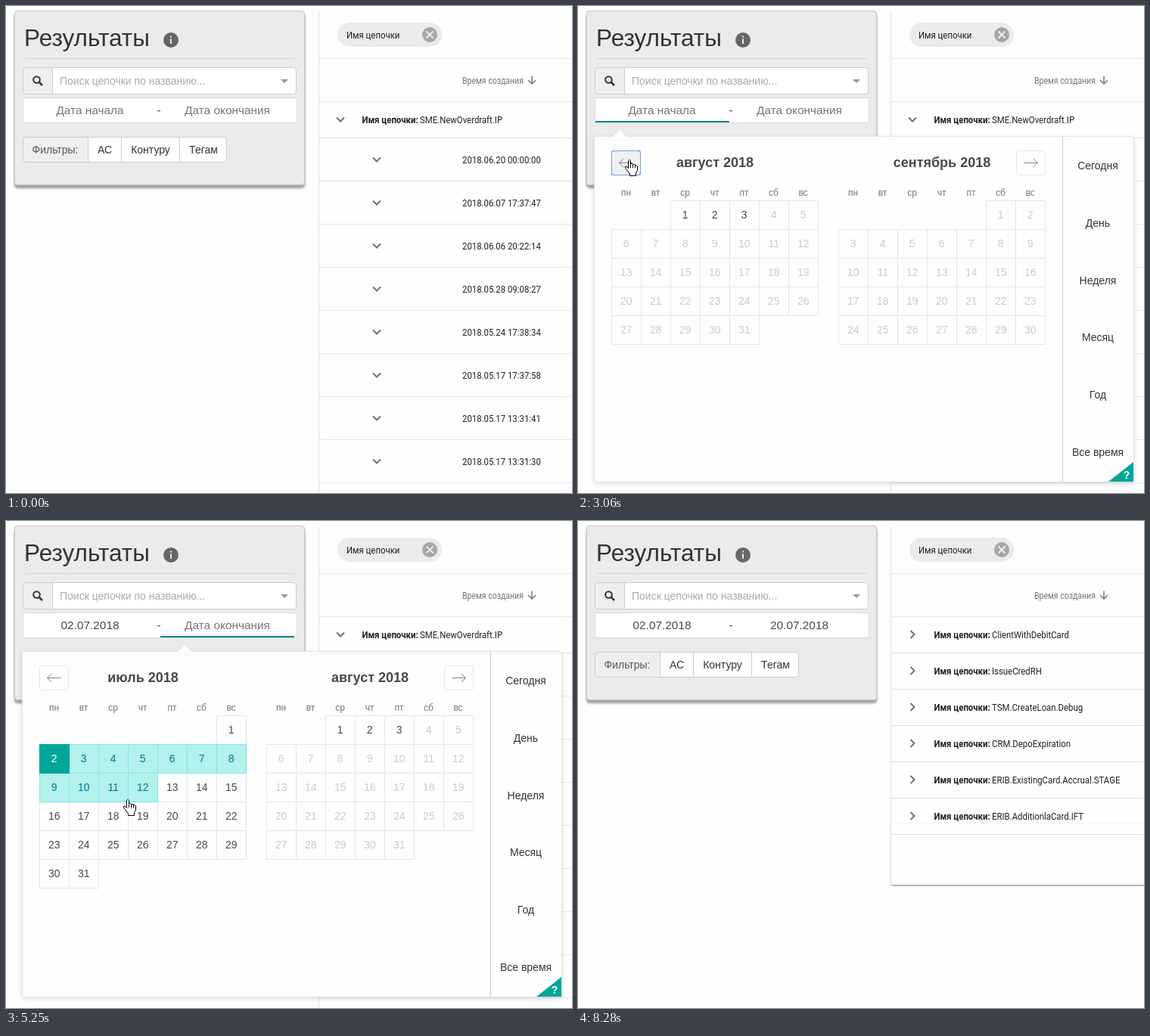
An HTML page with a canvas that plays this animation: 748x644 px, repeating every 8870 ms.

```html
<!DOCTYPE html>
<html lang="ru">
<head>
<meta charset="utf-8">
<title>Выбор периода</title>
<style>
html, body { margin: 0; width: 748px; height: 644px; overflow: hidden; background: #fefefe; }
canvas { display: block; }
</style>
</head>
<body>
<canvas id="stage" width="748" height="644"></canvas>
<script>
const ctx = document.getElementById('stage').getContext('2d');
const LOOP = 8870;
const PAPER = '#fefefe', TEAL = '#00a699', CELL_LINE = '#e4e7e7';
const SANS = '"Liberation Sans", Arial, sans-serif';
const ROBOTO = 'Roboto, sans-serif';
const CONDENSE = 0.875;

const T = { blank: 1920, open: 1980, caretOff: 2480, focusPrev: 3060, slide: 3240, slid: 3450,
  start: 4760, press: 6230, close: 6380, results: 6840, arrowBack: 7000, gone: 8280 };

// Pointer path: time, x, y of the hot spot
const PATH = [
  [750, 372, 0], [1550, 138, 137], [1769, 138, 137], [1770, 138, 140], [2480, 138, 140],
  [3060, 68, 203], [3540, 68, 203], [4080, 61, 306], [4140, 61, 308], [4760, 61, 308],
  [5610, 223, 405], [5700, 223, 405], [5790, 225, 404], [6380, 225, 404],
  [7000, 223, 403], [7870, 223, 403], [8280, 547, 644]
];

const MONTHS = [
  { name: 'июль 2018', offset: 6, days: 31, enabled: 31 },
  { name: 'август 2018', offset: 2, days: 31, enabled: 3 },
  { name: 'сентябрь 2018', offset: 5, days: 30, enabled: 0 }
];
const WEEK = ['пн', 'вт', 'ср', 'чт', 'пт', 'сб', 'вс'];
const PERIODS = ['Сегодня', 'День', 'Неделя', 'Месяц', 'Год', 'Все время'];
const RUNS = ['2018.06.20 00:00:00', '2018.06.07 17:37:47', '2018.06.06 20:22:14', '2018.05.28 09:08:27',
  '2018.05.24 17:38:34', '2018.05.17 17:37:58', '2018.05.17 13:31:41', '2018.05.17 13:31:30'];
const CHAINS = ['ClientWithDebitCard', 'IssueCredRH', 'TSM.CreateLoan.Debug', 'CRM.DepoExpiration',
  'ERIB.ExistingCard.Accrual.STAGE', 'ERIB.AdditionlaCard.IFT'];

const between = (t, a, b) => t >= a && t < b;
const clamp01 = v => Math.max(0, Math.min(1, v));
const ease = p => p * p * (3 - 2 * p);

function text(str, x, y, size, color, { align = 'left', weight = '', family = SANS } = {}) {
  ctx.font = `${weight} ${size}px ${family}`;
  ctx.textAlign = align;
  ctx.fillStyle = color;
  ctx.fillText(str, x, y);
}

const centered = (str, x, y, size, color, weight) => text(str, x, y, size, color, { align: 'center', weight });

function narrow(str, x, y, size, color, weight) {
  ctx.save();
  ctx.translate(x, y);
  ctx.scale(CONDENSE, 1);
  text(str, 0, 0, size, color, { weight, family: ROBOTO });
  ctx.restore();
}

function rect(x, y, w, h, fill) {
  ctx.fillStyle = fill;
  ctx.fillRect(x, y, w, h);
}

function box(x, y, w, h, fill, stroke, radius = 0) {
  ctx.beginPath();
  ctx.roundRect(x + 0.5, y + 0.5, w, h, radius);
  ctx.fillStyle = fill;
  ctx.fill();
  ctx.strokeStyle = stroke;
  ctx.lineWidth = 1;
  ctx.stroke();
}

function trace(points) {
  ctx.beginPath();
  points.forEach(([x, y], i) => i ? ctx.lineTo(x, y) : ctx.moveTo(x, y));
}

function polyline(points, color, width = 1) {
  trace(points);
  ctx.strokeStyle = color;
  ctx.lineWidth = width;
  ctx.stroke();
}

function polygon(points, fill) {
  trace(points);
  ctx.closePath();
  ctx.fillStyle = fill;
  ctx.fill();
}

function disc(x, y, r, fill) {
  ctx.beginPath();
  ctx.arc(x, y, r, 0, Math.PI * 2);
  ctx.fillStyle = fill;
  ctx.fill();
}

function withShadow(color, blur, dy, draw) {
  ctx.save();
  ctx.shadowColor = color;
  ctx.shadowBlur = blur;
  ctx.shadowOffsetY = dy;
  draw();
  ctx.restore();
}

function chevronDown(x, y) {
  polyline([[x - 5, y - 2.5], [x, y + 2.5], [x + 5, y - 2.5]], '#707070', 2);
}

function chevronRight(x, y) {
  polyline([[x - 2.5, y - 5], [x + 2.5, y], [x - 2.5, y + 5]], '#707070', 2);
}

function chainRow(name, y) {
  narrow('Имя цепочки:', 470.5, y + 5, 13, '#212121', 'bold');
  narrow(name, 547, y + 5, 13, '#212121');
  rect(414, y + 24, 334, 1, '#e0e0e0');
}

function drawTable(t) {
  const filtered = t >= T.results;
  if (filtered) {
    withShadow('rgba(0,0,0,.55)', 2, 1, () => rect(414, 400, 340, 81, PAPER));
    rect(414, 400, 334, 81, PAPER);
  }
  rect(413, 8, 1, filtered ? 473 : 636, '#e2e2e2');
  ctx.beginPath();
  ctx.roundRect(438, 22, 138, 32, 16);
  ctx.fillStyle = '#ebebeb';
  ctx.fill();
  narrow('Имя цепочки', 450, 43, 13, '#212121');
  disc(560, 38, 10, '#a6a6a6');
  polyline([[555.5, 33.5], [564.5, 42.5]], '#ebebeb', 2);
  polyline([[564.5, 33.5], [555.5, 42.5]], '#ebebeb', 2);
  rect(414, 69, 334, 1, '#e8e8e8');
  narrow('Время создания', 603, 103, 12, '#757575');
  polyline([[695, 92.5], [695, 103]], '#757575', 1.5);
  polyline([[690, 98], [695, 103], [700, 98]], '#757575', 1.5);
  rect(414, 126, 334, 1, '#e8e8e8');

  if (filtered) {
    CHAINS.forEach((name, i) => {
      chevronRight(442, 150 + i * 48);
      chainRow(name, 150 + i * 48);
    });
    return;
  }
  chevronDown(442, 150);
  chainRow('SME.NewOverdraft.IP', 150);
  RUNS.forEach((run, i) => {
    const y = 203 + i * 57;
    chevronDown(490, y);
    narrow(run, 603, y + 5, 13, '#212121');
    rect(414, y + 28, 334, 1, '#e8e8e8');
  });
}

function dateField(value, hint, x) {
  centered(value || hint, x, 143, 15.4, value ? '#484848' : '#757575');
}

function drawPanel(t) {
  withShadow('rgba(0,0,0,.35)', 3, 4, () => box(11, 6, 383, 230, '#ebebeb', '#c6c6c6', 4));
  box(11, 6, 383, 230, '#ebebeb', '#c6c6c6', 4);
  text('Результаты', 24, 53, 31.5, '#333');
  disc(218, 45, 10, '#666');
  rect(217, 43.5, 2, 6.5, '#ebebeb');
  rect(217, 39.5, 2, 2, '#ebebeb');
  rect(25, 69, 357, 1, '#d2d2d2');

  box(22, 81, 361, 35, '#fff', '#ccc', 4);
  box(22, 81, 39, 35, '#eee', '#ccc', [4, 0, 0, 4]);
  ctx.beginPath();
  ctx.arc(40.5, 97.5, 4.3, 0, Math.PI * 2);
  ctx.strokeStyle = '#333';
  ctx.lineWidth = 2;
  ctx.stroke();
  polyline([[43.5, 100.5], [48, 105]], '#333', 2.5);
  text('Поиск цепочки по названию...', 71, 104, 14, '#aaa');
  polygon([[363, 97], [373, 97], [368, 102]], '#999');

  box(22, 121, 362, 33, '#fff', '#dbdbdb');
  dateField(t >= T.start && '02.07.2018', 'Дата начала', 111);
  centered('-', 202, 143, 15.4, '#484848');
  dateField(t >= T.close && '20.07.2018', 'Дата окончания', 292.5);

  box(22, 173, 269, 33, '#fff', '#ccc', 4);
  box(22, 173, 86, 33, '#eee', '#ccc', [4, 0, 0, 4]);
  rect(152, 174, 1, 33, '#ccc');
  rect(229, 174, 1, 33, '#ccc');
  centered('Фильтры:', 65, 195, 14, '#555');
  centered('АС', 130.5, 195, 14, '#333');
  centered('Контуру', 191, 195, 14, '#333');
  centered('Тегам', 261, 195, 14, '#333');
}

function drawFocus(t) {
  const first = t < T.start;
  rect(first ? 23 : 204, 152, 177, 2, '#008489');
  if (between(t, T.blank, T.caretOff)) rect(111, 129, 1, 18, '#333');
  if (between(t, T.start, 5230) || between(t, 5700, T.press)) rect(293, 129, 1, 18, '#333');
  const x = first ? 55 : 236;
  polygon([[x - 10, 174], [x, 163.5], [x + 10, 174]], PAPER);
  polyline([[x - 10, 173], [x, 163.5], [x + 10, 173]], '#e0e0e0', 0.7);
}

// Day of July under the pointer, 0 when there is none
function dayAt(p) {
  const col = Math.floor((p.x - 44) / 39), row = Math.floor((p.y - 257) / 38);
  const day = row * 7 + col - 5;
  return col >= 0 && col < 7 && row >= 0 && day >= 1 && day <= 31 ? day : 0;
}

function dayStyle(month, day, t, hover) {
  if (day > month.enabled) return [PAPER, CELL_LINE, '#cacccd'];
  const plain = [PAPER, CELL_LINE, '#484848'];
  if (month !== MONTHS[0] || t < T.slid) return plain;
  if (t < T.start) return day === hover ? [CELL_LINE, '#dbdede', '#484848'] : plain;
  if (day === 2) return [TEAL, TEAL, '#fff'];
  if (day > 2 && day <= Math.max(3, hover))
    return [t >= T.press && day === hover ? '#80e8e0' : '#b2f1ec', '#80e8e0', '#007a87'];
  return plain;
}

function drawMonth(month, left, t, hover) {
  centered(month.name, left + 137, 213, 18, '#484848', 'bold');
  const cells = [];
  for (let day = 1; day <= month.days; day++) {
    const slot = day + month.offset - 1;
    const style = dayStyle(month, day, t, hover);
    const rank = style[0] === PAPER ? 0 : style[0] === TEAL ? 2 : 1;
    cells.push({ day, style, rank, x: left + slot % 7 * 39, y: 257 + Math.floor(slot / 7) * 38 });
  }
  cells.sort((a, b) => a.rank - b.rank);
  for (const { day, style: [fill, stroke, ink], x, y } of cells) {
    box(x, y, 39, 38, fill, stroke);
    centered(day, x + 19.7, y + 24, 14, ink);
  }
}

function navButton(x, dir, stroke, focused) {
  box(x, 191, 38, 32, focused ? '#f0f0f0' : PAPER, stroke, 3);
  if (focused) box(x, 191, 38, 32, 'rgba(0,0,0,0)', stroke, 1);
  const mid = x + 19.5, tip = mid + dir * 9;
  polyline([[mid - dir * 9, 207.5], [tip, 207.5]], '#82888a');
  polyline([[tip - dir * 6, 202], [tip, 207.5], [tip - dir * 6, 213]], '#82888a');
}

function drawCalendar(t, p) {
  if (t < T.open) {
    rect(22, 173, 712, 457, PAPER);
    return;
  }
  withShadow('rgba(0,0,0,.12)', 6, 2, () => box(21, 172, 713, 457, PAPER, '#e6e6e6', 3));

  const shift = 300 * ease(clamp01((t - T.slide) / (T.slid - T.slide)));
  const hover = dayAt(p);
  ctx.save();
  ctx.beginPath();
  ctx.rect(22, 173, 618, 456);
  ctx.clip();
  MONTHS.forEach((month, i) => drawMonth(month, 44 + (i - 1) * 300 + shift, t, hover));
  ctx.restore();

  for (const left of [63.5, 363.5])
    WEEK.forEach((name, i) => centered(name, left + i * 39, 251, 12, '#757575'));

  const focused = between(t, T.focusPrev, T.slide);
  navButton(44, -1, focused ? '#6f9de0' : overPrev(p) ? '#c4c4c4' : CELL_LINE, focused);
  navButton(579, 1, CELL_LINE, false);

  rect(640, 173, 1, 456, '#c8c8c8');
  PERIODS.forEach((name, i) => centered(name, 687, 216 + Math.round(i * 75.8), 14, '#333'));
  polygon([[701, 629], [734, 603], [734, 629]], TEAL);
  centered('?', 725, 625, 14, '#fff', 'bold');
}

const overPrev = p => p.x >= 44 && p.x <= 83 && p.y >= 191 && p.y <= 224;

function pointerAt(t) {
  let i = 0;
  while (i < PATH.length - 2 && t >= PATH[i + 1][0]) i++;
  const [t0, x0, y0] = PATH[i], [t1, x1, y1] = PATH[i + 1];
  const k = ease(clamp01((t - t0) / (t1 - t0)));
  return { x: Math.round(x0 + (x1 - x0) * k), y: Math.round(y0 + (y1 - y0) * k) };
}

function outlined(points) {
  polygon(points, '#fff');
  polyline([...points, points[0]], '#000');
}

function drawHand() {
  outlined([[5.5, 0.5], [6.5, 0.5], [7.5, 1.5], [7.5, 6], [9.5, 5.5], [10.5, 6.5], [12.5, 6.5], [13.5, 7.5],
    [15, 7.5], [16.5, 9], [16.5, 14], [14.5, 18], [14.5, 21.5], [6.5, 21.5], [6.5, 19], [2.5, 13.5],
    [0.5, 11], [0.5, 9.5], [2, 9], [4.5, 11.5], [4.5, 1.5]]);
  for (const x of [7.5, 10.5, 13.5]) polyline([[x, 6.5], [x, 11]], '#000');
}

function drawArrow() {
  outlined([[0.5, 0.5], [0.5, 16.5], [4.5, 13], [7, 18.5], [9, 17.5], [6.5, 12], [11.5, 12]]);
}

function drawBeam() {
  rect(0, -7, 1, 14, '#000');
  for (const y of [-8, 7]) {
    rect(-3, y, 3, 1, '#000');
    rect(1, y, 3, 1, '#000');
  }
}

function drawPointer(t, p) {
  if (!between(t, 750, T.close) && !between(t, T.arrowBack, T.gone)) return;
  const open = between(t, T.open, T.close);
  const onDay = open && t >= T.slid && dayAt(p);
  const hand = onDay || open && overPrev(p);
  const beam = p.x >= 22 && p.x <= 384 && p.y >= 121 && p.y <= 155;
  ctx.save();
  ctx.translate(p.x - (hand ? 6 : 0), p.y);
  (hand ? drawHand : beam ? drawBeam : drawArrow)();
  ctx.restore();
}

function frame() {
  const t = performance.now() % LOOP;
  const pointer = pointerAt(t);
  rect(0, 0, 748, 644, PAPER);
  drawTable(t);
  drawPanel(t);
  if (between(t, T.blank, T.close)) {
    drawCalendar(t, pointer);
    drawFocus(t);
  }
  drawPointer(t, pointer);
  requestAnimationFrame(frame);
}
frame();
</script>
</body>
</html>
```
